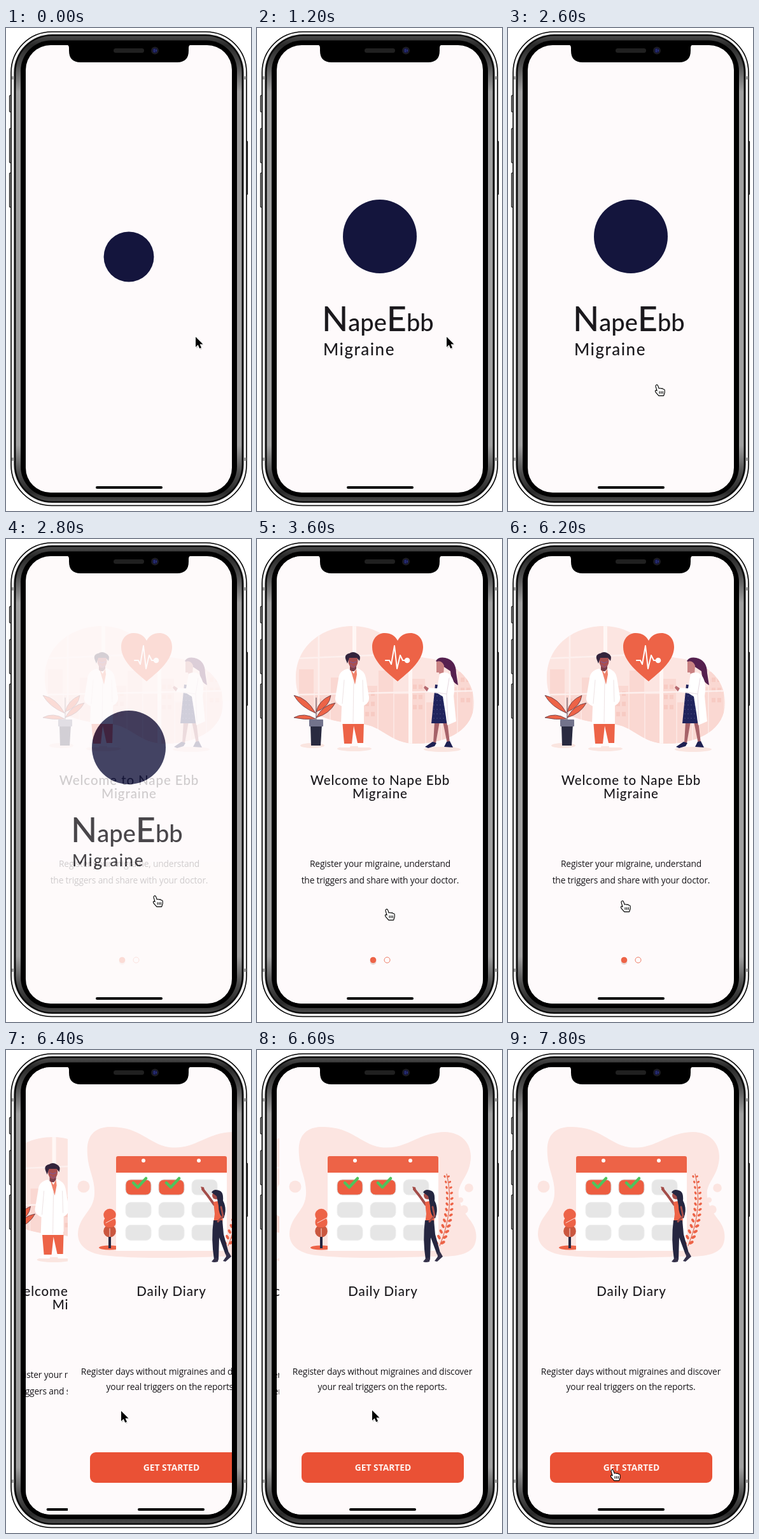
An HTML page for the animation above (8 s loop, 385x760 px).

```html
<!DOCTYPE html>
<html lang="en">
<head>
<meta charset="utf-8">
<title>Migraine app onboarding</title>
<style>
  html, body { margin: 0; width: 100%; height: 100%; overflow: hidden; background: #fff; }
  svg { display: block; width: 100%; height: 100%; }
  .brand { font-family: Lato, Inter, sans-serif; fill: #1b191d; font-weight: 500; }
  .title { font-size: 20.5px; letter-spacing: .9px; text-anchor: middle; }
  .body { font: 13.8px "Open Sans", "Noto Sans", sans-serif; letter-spacing: -.18px; fill: #18161a; text-anchor: middle; }
  .cta { font: 700 13.8px "Open Sans", sans-serif; fill: #fff3f0; text-anchor: middle; }
  .paper { fill: #fefafb; }
  .blob { fill: #fce5e1; }
  .coral { fill: #ed6347; }
  .navy { fill: #252640; }
  .line { fill: none; stroke-linecap: round; stroke-linejoin: round; }
</style>
</head>
<body>
<svg viewBox="0 0 385 760">
  <defs>
    <linearGradient id="steel" x2="0" y2="1">
      <stop offset="0" stop-color="#4a4a4a"/><stop offset=".02" stop-color="#2a2a2a"/>
      <stop offset=".06" stop-color="#4c4c4c"/><stop offset=".12" stop-color="#a0a0a0"/>
      <stop offset=".88" stop-color="#a0a0a0"/><stop offset=".94" stop-color="#4c4c4c"/>
      <stop offset=".98" stop-color="#2a2a2a"/><stop offset="1" stop-color="#4a4a4a"/>
    </linearGradient>
    <clipPath id="screenClip"><rect x="31" y="27" width="324" height="704" rx="39"/></clipPath>
    <clipPath id="cityClip"><use href="#cityShape"/></clipPath>
    <path id="cityShape" d="M61 217C62 166 105 137 151 137C204 137 222 180 264 187C312 192 341 220 341 258C341 300 299 322 249 322C209 322 197 293 163 291C107 288 60 273 61 217Z"/>
    <rect id="home" x="141" y="721" width="105" height="4" rx="2"/>
  </defs>

  <!-- phone body -->
  <g fill="#bbb" stroke="#111" stroke-width="1.2">
    <rect x="5.5" y="106" width="4" height="26" rx="1"/>
    <rect x="5.5" y="158" width="4" height="54" rx="1"/>
    <rect x="5.5" y="228" width="4" height="54" rx="1"/>
    <rect x="375.5" y="178" width="4" height="84" rx="1"/>
  </g>
  <rect x="8" y="6" width="370" height="745.5" rx="64" fill="#f4f4f4" stroke="#000" stroke-width="1.6"/>
  <rect x="12.500" y="10" width="361" height="737" rx="60" fill="#0c0c0c"/>
  <rect x="15.5" y="12.5" width="355" height="732" rx="57" fill="url(#steel)"/>
  <path d="M9 78.5h4M373.5 78.5h4M9 678.5h4M373.5 678.5h4" stroke="#999" stroke-width="5"/>
  <rect x="23" y="19.5" width="340" height="718.5" rx="48" fill="#000"/>

  <g clip-path="url(#screenClip)">
    <rect class="paper" x="31" y="27" width="325" height="705"/>

    <g id="splash">
      <circle id="mark" r="58" fill="#14153d"/>
      <g id="wordmark" class="brand">
        <text x="102" y="477" font-size="54">N<tspan font-size="38">ape</tspan>E<tspan font-size="38">bb</tspan></text>
        <text x="104" y="515" font-size="26" letter-spacing="1.5">Migraine</text>
      </g>
      <use href="#home"/>
    </g>

    <g id="welcome">
      <rect class="paper" x="31" y="27" width="325" height="705"/>
      <use href="#cityShape" class="blob"/>
      <g clip-path="url(#cityClip)">
        <g id="city" fill="#fad8d2"></g>
        <path d="M97 140V290M61 188L341 176M60 245L342 239" stroke="#fdf0ee" stroke-width="2.5" fill="none"/>
        <path d="M153 130V300M241 170V330" stroke="#fff7f5" stroke-width="6"/>
      </g>
      <g fill="#fae5e0">
        <ellipse cx="87" cy="325" rx="19" ry="4"/><ellipse cx="153" cy="330" rx="27" ry="4"/><ellipse cx="291" cy="331" rx="29" ry="4"/>
      </g>
      <path class="coral" d="M221 224C207 212 181 193 181 170C181 156 190 148 201 148C210 148 217 152 221 160C225 152 232 148 241 148C252 148 261 156 261 170C261 193 235 212 221 224Z"/>
      <path class="line" d="M202 191h6l3 6 5-29 4 36 5-21 4 8h6" stroke="#fff" stroke-width="2"/>
      <circle cx="236" cy="191" r="4.3" fill="#fff"/>

      <!-- plant -->
      <path class="line" d="M93 285V250" stroke="#493a48"/>
      <g class="coral" stroke="#5a3844" stroke-width=".8">
        <path d="M92 274Q79 250 58 246Q68 264 92 274Z"/><path d="M92 283Q74 272 58 281Q74 285 92 283Z"/>
        <path d="M93 272Q97 254 116 246Q114 264 93 272Z"/><path d="M93 281Q104 261 123 258Q114 275 93 281Z"/>
      </g>
      <path d="M84 292h18l-2 33H85Z" fill="#292a40"/><rect x="82" y="284" width="22" height="11" rx="1" fill="#73738c"/>

      <!-- doctor -->
      <path class="coral" d="M134 286h34l-1 35h-9l-6-27-3 28h-12Z"/>
      <path d="M137 322h10l-1 6h-15q0-3 6-6M158 321h9l10 7h-18Z" fill="#fff"/>
      <path d="M146 196h10v12h-10Z" fill="#793d4b"/>
      <path d="M143 204Q129 207 128 220L123 250Q122 258 133 263L132 291H168V262Q177 258 176 248L171 218Q169 207 157 203L151 210Z" fill="#fff"/>
      <path d="M147 205l5 7 4-8 1 9-3 16Z" class="coral" opacity=".8"/>
      <path class="line" d="M152 222l-1 67M137 222l-3 37M166 222l1 34" stroke="#eadbdc" stroke-width=".8"/>
      <ellipse cx="151" cy="192" rx="7.5" ry="11" fill="#a84e50"/>
      <path d="M140 191Q136 182 145 180Q151 176 157 180Q164 183 161 192L157 187H145L142 196Z" fill="#33243c"/>
      <path class="line" d="M146 193l5 2 5-2M147 198l5 4 3-3" stroke="#735aa8" stroke-width=".9"/>

      <!-- colleague -->
      <path d="M279 287l-2 34h4l6-34M292 287l7 35 4-1-4-34" fill="#a76269"/>
      <path d="M276 319l6 2-3 5-10 3-5-2ZM298 319l5-1 5 10-14-1Z" fill="#1e2052"/>
      <path d="M280 229l15 2 3 59h-24Z" fill="#20235c"/>
      <g fill="#7c7ca4" id="pattern"></g>
      <path d="M281 192Q285 185 296 187Q313 191 313 211L316 230Q305 225 304 208L295 202Z" fill="#55204f"/>
      <path d="M282 193q8-3 12 6l-1 15h-6l-1-4h-4Z" fill="#c98283"/>
      <path d="M287 212Q301 206 307 219Q312 230 309 247L313 287 299 293 292 248 284 243 266 240 268 234 283 235Z" fill="#fff"/>
      <path class="line" d="M302 219l-4 25-19-3M298 244l2 43" stroke="#e5d7df"/>
      <path d="M264 231l6 4-3 5-5-6Z" fill="#b66a70"/>

      <text class="brand title" x="193.5" y="387">Welcome to Nape Ebb<tspan x="193.5" y="408">Migraine</tspan></text>
      <text class="body" x="193.5" y="516">Register your migraine, understand<tspan x="193.5" y="542">the triggers and share with your doctor.</tspan></text>
      <circle cx="182.5" cy="665" r="5" fill="#e8d7d5"/><circle class="coral" cx="182.5" cy="662.5" r="4.8"/>
      <circle cx="204.5" cy="662.5" r="4.5" fill="none" stroke="#ed7760"/>
      <use href="#home"/>
    </g>

    <g id="diary">
      <rect class="paper" x="31" y="27" width="325" height="705"/>
      <path class="blob" d="M62 165C59 132 76 120 101 121C146 122 157 147 190 153C231 158 247 130 291 129C322 130 336 152 331 178C326 205 306 212 315 239C320 263 344 271 340 299C337 323 308 326 270 325C205 327 141 329 88 323C57 319 43 303 48 281C54 257 72 252 73 226C74 203 63 188 62 165Z"/>
      <g class="blob"><circle cx="56" cy="215" r="9.5"/><circle cx="329" cy="217" r="6.8"/><circle cx="316" cy="236" r="4.2"/><circle cx="321" cy="251" r="6.7"/></g>
      <ellipse class="coral" cx="97" cy="311" rx="17" ry="3.5"/>
      <circle class="coral" cx="97" cy="259.5" r="9.7"/><circle cx="97" cy="285" r="9.8" fill="#ca573f"/>
      <rect class="coral" x="87.5" y="263" width="19" height="16" rx="7"/>
      <path d="M97 281v31M91 272l15-8" class="line" stroke="#fbe1dc"/>
      <path d="M95 294h4v18h-4Z" class="navy"/>
      <rect x="107" y="190" width="174" height="126" fill="#fff"/>
      <path class="coral" d="M107 193V170q0-3 3-3h168q3 0 3 3v23Z"/>
      <circle cx="150" cy="174" r="3" fill="#fff"/><circle cx="237" cy="174" r="3" fill="#fff"/>
      <g id="cells"></g>
      <g id="fern" class="coral"><path class="line" d="M294 195Q307 250 283 308" stroke="#dc6b55" stroke-width="1.2"/></g>

      <!-- woman at the calendar -->
      <path class="line" d="M261 243L251 229 243 219" stroke="#a44d49" stroke-width="4"/>
      <path d="M240 215l5 1 1 5-4-1Z" fill="#a44d49"/>
      <path class="coral" d="M260 239l12-2 4 15-2 21h-14l2-15Z"/>
      <path class="navy" d="M260 268h14l2 22 8 29-5 3-10-27-1 35h-7Q256 298 260 268Z"/>
      <path d="M262 327h6l-1 6q-6 2-10 0ZM279 319l5-1 4 7-9 8-4-1 5-7Z" fill="#343049"/>
      <circle cx="264" cy="229" r="6" fill="#a44d49"/>
      <path class="navy" d="M257 224Q261 217 271 222Q276 225 275 237Q282 250 276 265Q268 260 268 245L265 230Z"/>
      <path class="line" d="M272 247l3 14-8 9" stroke="#a44d49" stroke-width="3"/>

      <text class="brand title" x="194" y="387">Daily Diary</text>
      <text class="body" x="193" y="511">Register days without migraines and discover<tspan x="193" y="535">your real triggers on the reports.</tspan></text>
      <rect x="66" y="633" width="255" height="48" rx="9" fill="#ea5135"/>
      <text class="cta" x="194" y="662">GET STARTED</text>
      <use href="#home"/>
    </g>
  </g>

  <!-- notch -->
  <path d="M95 26.5q4 0 4 5v4q0 18.500 18 18.500h152q18 0 18-18.500v-4q0-5 4-5Z"/>
  <rect x="169" y="32" width="48" height="7" rx="3.5" fill="#202020"/>
  <circle cx="234" cy="35.5" r="6" fill="#1c1c21"/><circle cx="234" cy="35.5" r="3.7" fill="#17194a"/>
  <path d="M233 33v5M236 34v3" stroke="#3b45a0"/>

  <g id="cursor">
    <g id="arrow">
      <path d="M1 2V18L5 15 7.500 20 10 19 8 13H13Z" opacity=".2"/>
      <path d="M0 0V16L3.700 12.500 6.200 18.300 9 17 6.500 11.400H11.500Z" stroke="#fff" stroke-width="2" paint-order="stroke"/>
    </g>
    <path id="hand" transform="translate(1 0) scale(1.04)" d="M-1.8 9.5L-3.800 3Q-4.200 1-2.600 .5Q-1 .1-.4 1.800L1.200 6Q3.400 5 4.500 6.300Q6.300 5.400 7.300 7Q9.800 6.700 9.800 9V12L8.300 17H.8L-3.800 11.600Q-5 9.500-3.700 8.700Q-2.800 8.400-1.800 9.500ZM2 10v4M4.500 10v4M7 10v4" fill="#fff" stroke="#000" stroke-width="1.1" stroke-linejoin="round"/>
  </g>
</svg>
<script>
  const LOOP = 8000, TICK = 200, WIDTH = 324;
  const byId = id => document.getElementById(id);

  function add(parent, tag, attrs) {
    const el = document.createElementNS("http://www.w3.org/2000/svg", tag);
    for (const key in attrs) el.setAttribute(key, attrs[key]);
    parent.appendChild(el);
  }

  // Skyline: every third building has windows
  for (let i = 0; i < 11; i++) {
    const x = 66 + i * 25, y = 205 + (i * 37 % 61);
    add(byId("city"), "rect", { x, y, width: 23, height: 130 });
    if (i % 3 === 1) for (let j = 0; j < 6; j++) add(byId("city"), "rect", {
      x: x + 4 + j % 2 * 9, y: y + 9 + (j >> 1) * 16, width: 6, height: 7, fill: "#f7cbc3"
    });
  }
  for (let i = 0; i < 24; i++) add(byId("pattern"), "circle", {
    cx: 278 + i % 4 * 5, cy: 247 + (i >> 2) * 7, r: .55
  });

  for (let i = 0; i < 9; i++) {
    const x = 122 + i % 3 * 52, y = 204 + Math.floor(i / 3) * 35.7, done = i < 2;
    add(byId("cells"), "rect", { x, y, width: 40, height: 24, rx: 8,
      fill: done ? "#ed5d40" : "#e6e6e6", stroke: done ? "#d9d0cf" : "#eee" });
    if (done) add(byId("cells"), "path", { d: `M${x + 12} ${y + 5}l7 7 13-14`, class: "line",
      stroke: "#4fc35c", "stroke-width": 4.5 });
  }

  for (let i = 0; i < 13; i++) {
    const u = i / 12, x = 294 + 26 * u - 37 * u * u, y = 201 + 104 * u;
    for (const side of [-1, 1]) add(byId("fern"), "ellipse", {
      rx: 2 + 2 * u, ry: 1.5 + .7 * u,
      transform: `translate(${x + side * (3 + 2 * u)} ${y - 2}) rotate(${side * -45 + 15})`
    });
  }

  // Keyframes: time followed by the values at that time
  const markPath = [[0, 360, .68], [200, 357, .71], [400, 346, .82], [600, 335, .93], [800, 328, 1]];
  const wordFade = [[200, 0], [400, .3], [600, .7], [800, 1]];
  const dissolve = [[2600, 0], [2800, .2], [3000, .65], [3200, .93], [3400, 1]];
  const slide = [[6200, WIDTH], [6400, 66], [6600, 4], [6800, 0]];
  const pointer = [
    [1200, 298, 486], [1600, 289, 505], [2000, 254, 546], [2400, 235, 561],
    [2800, 235, 561], [3600, 205, 582], [3800, 217, 588], [4000, 306, 500], [4200, 300, 230],
    [4400, 235, 15], [4600, 169, 90], [4800, 195, 157], [5000, 223, 300], [5200, 292, 508],
    [5400, 98, 512], [5600, 285, 540], [5800, 236, 574], [6000, 190, 573], [6200, 181, 569],
    [6600, 181, 567], [7200, 181, 567], [7400, 184, 588], [7600, 174, 637], [7800, 165, 660]
  ];

  function sample(keys, t) {
    const next = keys.findIndex(k => k[0] >= t);
    if (next === 0) return keys[0].slice(1);
    if (next < 0) return keys[keys.length - 1].slice(1);
    const a = keys[next - 1], b = keys[next], p = (t - a[0]) / (b[0] - a[0]);
    return a.slice(1).map((v, i) => v + (b[i + 1] - v) * p);
  }

  const show = (id, on) => byId(id).style.display = on ? "" : "none";
  const move = (id, x, y, scale = 1) =>
    byId(id).setAttribute("transform", `translate(${x} ${y}) scale(${scale})`);

  function render(t) {
    move("mark", 193, ...sample(markPath, t));
    byId("wordmark").style.opacity = sample(wordFade, t)[0];
    byId("welcome").style.opacity = sample(dissolve, t)[0];

    const [offset] = sample(slide, t);
    move("welcome", -.3 * (WIDTH - offset), 0);
    move("diary", offset, 0);
    show("diary", t > 6200);

    const hand = t >= 2400 && t < 6400 || t >= 7600;
    show("hand", hand);
    show("arrow", !hand);
    move("cursor", ...sample(pointer, t));
  }

  function frame() {
    render(Math.floor(performance.now() % LOOP / TICK) * TICK);
    requestAnimationFrame(frame);
  }
  frame();
</script>
</body>
</html>
```
